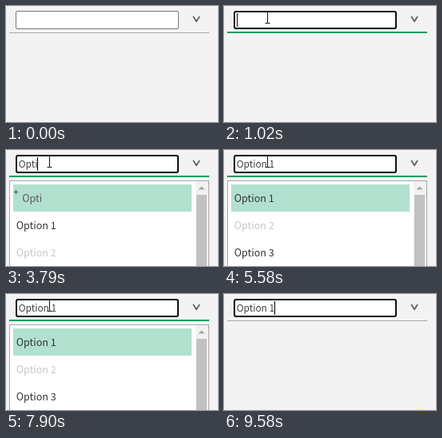
Write an HTML page that moves like this. It is 265 by 145 pixels and loops after 9.63 s.

```html
<!DOCTYPE html>
<html lang="en">
<head>
<meta charset="utf-8">
<title>Combobox</title>
<style>
  html, body { margin: 0; width: 100%; height: 100%; overflow: hidden; background: #f3f3f3; }
  svg { display: block; width: 100vw; height: 100vh; }
  text { font: 12.5px "Noto Sans CJK JP", "Noto Sans CJK SC", "Noto Sans CJK", "Open Sans", sans-serif; fill: #333; }
  #value { font-size: 11.9px; fill: #404040; }
  #new text { fill: #595959; }
  .off { fill: #c3c9c6; }
  .line { fill: none; stroke: #595959; }
</style>
</head>
<body>
<svg viewBox="0 0 265 145">
  <rect width="265" height="145" fill="#f3f3f3"/>
  <rect id="rule" x="4" y="33" width="250" height="1" fill="#a6a6a6"/>
  <rect id="ruleHover" x="4" y="32" width="250" height="2" fill="#009f5b"/>
  <rect id="thin" x="12.5" y="6.5" width="203" height="22" rx="1.5" fill="#fff" stroke="#767676"/>
  <rect id="thick" x="13" y="7" width="202" height="21" rx="2" fill="#fff" stroke="#101010" stroke-width="2"/>
  <path class="line" d="M234 13L238 19.3L242 13" stroke-width="1.6"/>
  <text id="value" x="15.7" y="22"></text>
  <rect id="caret" y="9" width="1" height="17"/>

  <g id="popup">
    <rect x="4.5" y="38.5" width="249" height="120" fill="#fff" stroke="#a8a8a8"/>
    <rect x="237" y="39" width="16" height="106" fill="#f1f1f1"/>
    <rect x="238" y="56" width="13" height="89" fill="#c1c1c1"/>
    <path d="M240.5 49.5L244.5 45.5L248.5 49.5Z" fill="#a3a3a3"/>
    <rect id="mark" x="9" y="43" width="223" height="34" fill="#b2e0cf"/>
    <g id="new">
      <path class="line" d="M9.5 52.5h6M12.5 49.5v6"/>
      <text id="newText" x="20.2" y="65"></text>
    </g>
    <g id="options">
      <text x="12.7" y="65">Option 1</text>
      <text class="off" x="12.7" y="99">Option 2</text>
      <text x="12.7" y="133">Option 3</text>
    </g>
  </g>

  <circle id="click" r="14" fill="#ff0" fill-opacity=".55"/>
  <g id="pointer">
    <path id="beam" d="M-3 -7.5h2.5q.5 0 .5 .5q0 -.5 .5 -.5h2.5M0 -7V6M-3 6.5h2.5q.5 0 .5 -.5q0 .5 .5 .5h2.5" fill="none" stroke="#111"/>
    <path id="arrow" d="M.5 .5V16.5L4.2 13L6.6 18.5L9 17.4L6.6 12.2H11.7Z" fill="#fff" stroke="#000"/>
  </g>
</svg>
<script>
const LOOP = 9630;
const FULL = "Option 1";
const CARET_X = [16, 24, 32, 36, 39, 47, 54, 56, 63];
const HOME = [54.5, 14.5];
const $ = id => document.getElementById(id);

// Each entry changes part of the state at its time (ms).
const steps = [
  [0,    { chars: 0, caret: 0, focus: 0, open: 0, add: 0, mark: 0 }],
  [960,  { focus: 1, caret: 1 }],
  [1090, { focus: 0, caret: 0, open: 1 }],
  [1680, { focus: 1, caret: 1 }],
  [2220, { caret: 0 }],
  [2740, { caret: 1 }],
  [2950, { chars: 1, add: 1, mark: 1 }],
  [3140, { chars: 2 }],
  [3660, { caret: 0 }],
  [3710, { chars: 3, caret: 1 }],
  [3760, { chars: 4 }],
  [3820, { chars: 5 }],
  [3870, { chars: 6 }],
  [4390, { caret: 0 }],
  [4470, { chars: 7, caret: 1 }],
  [4980, { caret: 0 }],
  [5060, { chars: 8, caret: 1, add: 0 }],
  [5580, { caret: 0 }],
  [6000, { chars: 7, caret: 1, add: 1, mark: 0 }],
  [6620, { caret: 0 }],
  [7140, { caret: 1 }],
  [7400, { chars: 8, add: 0, mark: 1 }],
  [7900, { caret: 0 }],
  [7960, { open: 0 }],
  [8410, { caret: 1 }],
  [8910, { caret: 0 }],
  [9480, { caret: 1 }]
];

// Click halos: start, end, x, y
const clicks = [[960, 1020, 54, 15], [1680, 1790, 54, 15], [9580, LOOP, 245.5, 157]];

const mix = (a, b, k) => a.map((v, i) => v + (b[i] - v) * k);
const show = (id, on) => $(id).setAttribute("visibility", on ? "inherit" : "hidden");

function pointerAt(t) {
  if (t < 240 || t >= 9190) return null;
  if (t < 730) return mix([205, 144], HOME, 1 - (1 - (t - 240) / 490) ** 2);
  if (t < 8910) return HOME;
  return mix(HOME, [200, 103], ((t - 8910) / 280) ** 1.3);
}

function drawPointer(t) {
  const p = pointerAt(t);
  const hover = p && p[1] < 34;
  const inside = p && p[0] > 12 && p[0] < 216 && p[1] > 6 && p[1] < 29;
  show("pointer", p);
  show("beam", inside);
  show("arrow", p && !inside);
  show("rule", !hover);
  show("ruleHover", hover);
  if (p) $("pointer").setAttribute("transform", `translate(${Math.floor(p[0]) + (inside ? .5 : 0)} ${Math.floor(p[1]) + (inside ? 1 : 0)})`);

  const c = clicks.find(([from, to]) => t >= from && t < to);
  show("click", c);
  if (c) $("click").setAttribute("transform", `translate(${c[2]} ${c[3]})`);
}

function draw(t) {
  const s = {};
  for (const [at, change] of steps) if (t >= at) Object.assign(s, change);
  const typed = FULL.slice(0, s.chars);
  $("value").textContent = typed;
  $("newText").textContent = typed.trim();
  $("caret").setAttribute("x", CARET_X[s.chars]);
  $("options").setAttribute("transform", `translate(0 ${s.add ? 34 : 0})`);
  show("thin", !s.focus);
  show("thick", s.focus);
  show("caret", s.caret);
  show("popup", s.open);
  show("mark", s.mark);
  show("new", s.add);
  drawPointer(t);
}

const start = performance.now();
function tick() {
  draw((performance.now() - start) % LOOP);
  requestAnimationFrame(tick);
}
tick();
</script>
</body>
</html>
```
